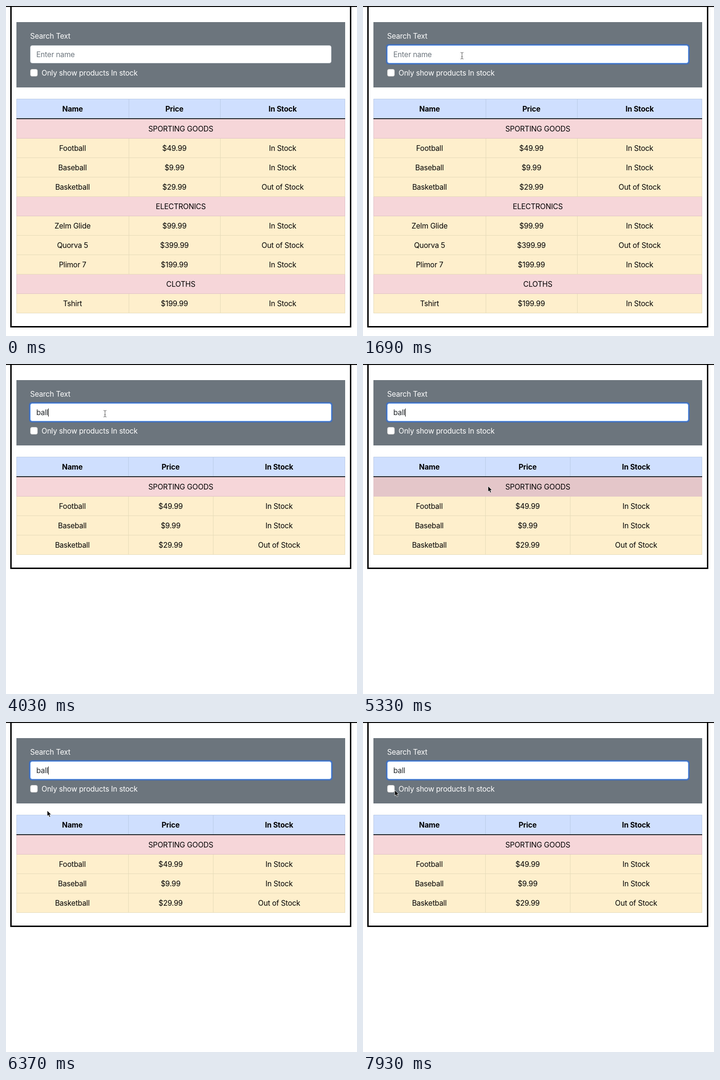
Animation of 741x697 px, one loop 8000 ms. Source, as an HTML page:

```html
<!DOCTYPE html>
<html lang="en">
<head>
<meta charset="utf-8">
<title>Product search</title>
<style>
html, body { margin: 0; width: 100%; height: 100%; overflow: hidden; background: #fff; }
svg { display: block; }
text { font: 15.5px Inter, "Liberation Sans", sans-serif; letter-spacing: -.2px; white-space: pre; }
.cell { text-anchor: middle; }
.bold { font-weight: 700; }
</style>
</head>
<body>
<svg id="stage" width="741" height="697" viewBox="0 0 741 697">
  <rect width="741" height="2"/>
  <rect x="22" y="34" width="694" height="138" fill="#6c757d"/>
  <text x="51" y="69" fill="#fff">Search Text</text>
  <rect id="ring" x="48.5" y="80.5" width="641" height="43" rx="6" fill="#4270bd"/>
  <rect id="box" x="51.5" y="83.5" width="635" height="37" rx="4" fill="#fff"/>
  <text id="query" x="64" y="108"></text>
  <rect id="caret" y="94" width="1" height="17"/>
  <rect x="51.5" y="133.5" width="15" height="15" rx="3.5" fill="#fff" stroke="#bfbfbf"/>
  <text x="75" y="147" fill="#fff">Only show products In stock</text>
  <g id="tables"></g>
  <path id="arrow" d="M0 0V12L2.7 9.5 4.6 14 6.8 13 4.9 8.7H8.6Z" stroke="#fff" stroke-width=".8"/>
  <path id="beam" d="M-3-7Q0-7 0-5Q0-7 3-7M0-5V5M-3 7Q0 7 0 5Q0 7 3 7M-1.5 2H1.5" fill="none" stroke="#555"/>
</svg>
<script>
const $ = id => document.getElementById(id);
const STEP = 130, LOOP = 8000, TOP = 238, ROW = 41;
const PINK = ["#f6d6d9", "#e4c6c9", "#dfc2c6"], YELLOW = ["#feefcc", "#eadebc", "#e6dbb9"];

const goods = [
  "SPORTING GOODS", "Football|$49.99|In Stock", "Baseball|$9.99|In Stock", "Basketball|$29.99|Out of Stock",
  "ELECTRONICS", "Zelm Glide|$99.99|In Stock", "Quorva 5|$399.99|Out of Stock", "Plimor 7|$199.99|In Stock",
  "CLOTHS", "Tshirt|$199.99|In Stock"
];

function add(parent, tag, attrs, text = "") {
  const el = document.createElementNS("http://www.w3.org/2000/svg", tag);
  for (const k in attrs) el.setAttribute(k, attrs[k]);
  el.textContent = text;
  parent.append(el);
  return el;
}

function makeTable(list, cols) {
  const g = add($("tables"), "g", {});
  const end = TOP + ROW * list.length;
  const mid = i => (cols[i] + cols[i + 1]) / 2;
  const cells = (names, y, line, top, h, cls) => names.forEach((name, i) => {
    if (i) add(g, "rect", { x: cols[i], y: top, width: 1, height: h, fill: line });
    add(g, "text", { x: mid(i), y, class: cls }, name);
  });
  add(g, "path", { d: `M10.5 0V${end + 29.5}H727.5V0`, fill: "none", stroke: "#000", "stroke-width": 3 });
  add(g, "rect", { x: 22.5, y: 196.5, width: 693, height: 41, fill: "#cfdffe", stroke: "#bacbe6" });
  cells(["Name", "Price", "In Stock"], 223, "#bacbe6", 197, 41, "cell bold");

  // bottom up, so that each row's lower border covers the next row's top
  const rows = [];
  for (let i = list.length - 1; i >= 0; i--) {
    const names = list[i].split("|"), y = TOP + ROW * i;
    const tint = names.length > 1 ? YELLOW : PINK;
    rows[i] = { tint, el: add(g, "rect", { x: 22.5, y: y + .5, width: 693, height: ROW, stroke: tint[2] }) };
    if (names.length > 1) cells(names, y + 27, tint[2], y + 1, ROW - 1, "cell");
    else add(g, "text", { x: 369, y: y + 27, class: "cell" }, names[0]);
  }
  add(g, "rect", { x: 22, y: 237, width: 694, height: 2, fill: "#212529" });
  return { g, rows };
}

const full = makeTable(goods, [22, 259, 452, 716]);
const found = makeTable(goods.slice(0, 4), [22, 258, 437, 716]);

// time, x, y
const path = [
  [650, 300, 640], [1040, 209, 105], [5200, 209, 105], [5330, 264, 258], [5980, 72, 174],
  [6240, 67, 147], [6890, 166, 346], [7020, 170, 350], [7930, 67, 144]
];
const typed = [[2990, "b"], [3120, "ba"], [3380, "bal"], [4030, "ball"]];

function pointer(t) {
  const i = path.findIndex(p => p[0] > t);
  if (i < 0) return path.at(-1).slice(1);
  if (i === 0) return null;
  const [t0, x0, y0] = path[i - 1], [t1, x1, y1] = path[i];
  const k = (t - t0) / (t1 - t0);
  return [x0 + (x1 - x0) * k, y0 + (y1 - y0) * k];
}

const show = (el, on) => el.setAttribute("visibility", on ? "visible" : "hidden");

function draw(ms) {
  const t = Math.floor(ms / STEP) * STEP;
  const focus = t >= 1170;
  const key = typed.findLast(k => k[0] <= t);
  const query = $("query");
  query.textContent = key ? key[1] : "Enter name";
  query.setAttribute("fill", key ? "#212529" : "#6c757d");
  show($("ring"), focus);
  $("box").setAttribute("stroke", focus ? "#86b7fe" : "#ced4da");

  const since = t - (key ? key[0] : 1170);
  show($("caret"), focus && Math.floor(since / 520) % 2 === 0);
  $("caret").setAttribute("x", 64 + (key ? Math.round(query.getComputedTextLength()) : 0));

  const table = key ? found : full;
  show(full.g, !key);
  show(found.g, key);

  const at = pointer(t);
  const over = at ? Math.floor((at[1] - TOP) / ROW) : -1;
  table.rows.forEach((r, i) => r.el.setAttribute("fill", r.tint[i === over ? 1 : 0]));

  const inBox = at && at[1] > 83 && at[1] < 121;
  const onName = at && over >= 0 && Math.abs(at[0] - 140) < 36 && Math.abs(at[1] - TOP - ROW * (over + .5)) < 11;
  show($("beam"), at && (inBox || onName));
  show($("arrow"), at && !inBox && !onName);
  if (at) for (const id of ["beam", "arrow"])
    $(id).setAttribute("transform", `translate(${Math.round(at[0])} ${Math.round(at[1])})`);
}

const start = performance.now();
function tick() {
  draw((performance.now() - start) % LOOP);
  requestAnimationFrame(tick);
}
tick();
</script>
</body>
</html>
```
